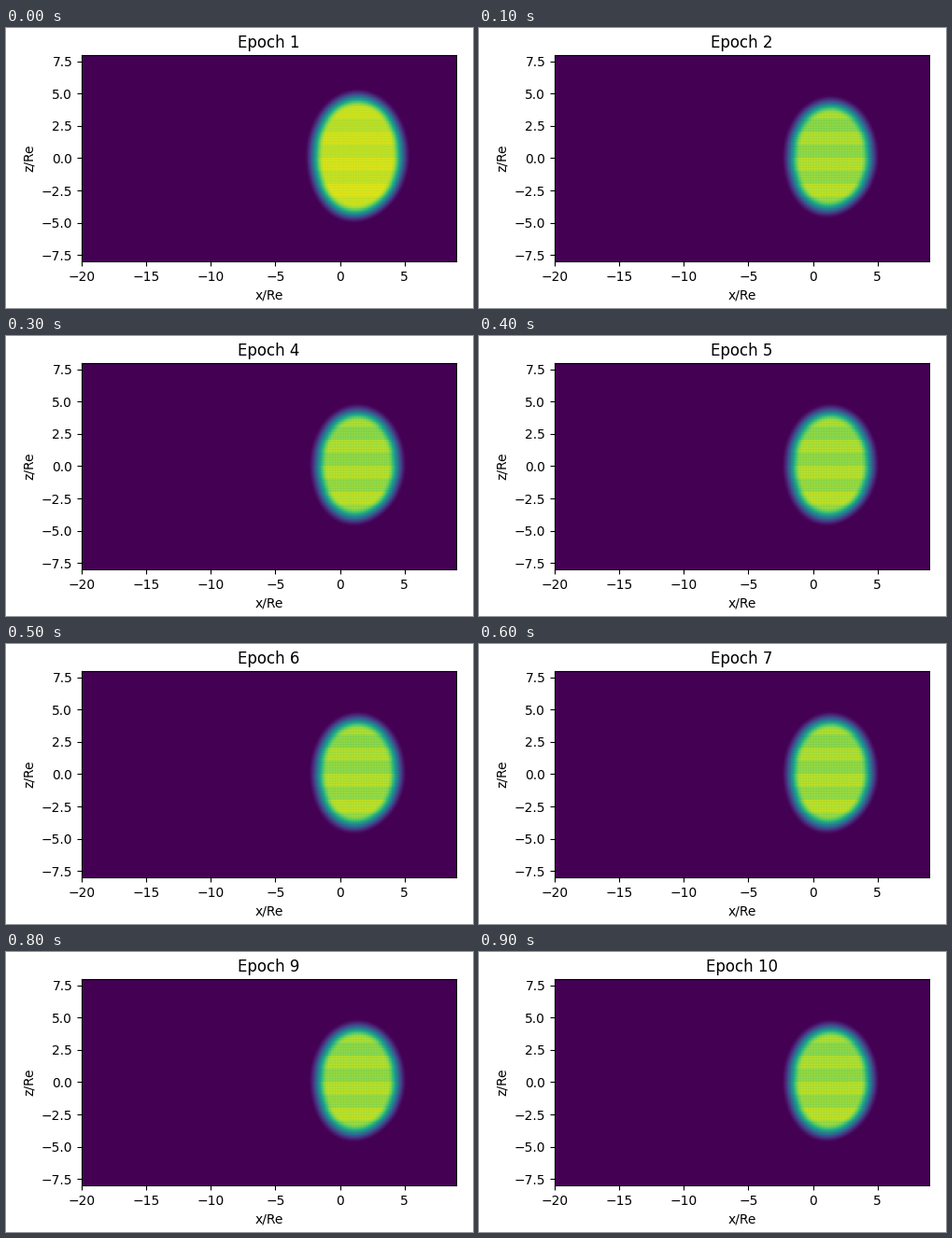
A matplotlib script that plays this animation: 500x300 px, repeating every 1000 ms.

```python
import numpy as np
import matplotlib.pyplot as plt
from matplotlib.animation import FuncAnimation

W, H, DPI = 500, 300, 100
EPOCHS, INTERVAL = 10, 100
X_MIN, X_MAX, Z_MIN, Z_MAX = -20, 9, -8, 8
CELL = 0.1

x = np.arange(X_MIN, X_MAX, CELL) + CELL / 2
z = np.arange(Z_MIN, Z_MAX, CELL) + CELL / 2
X, Z = np.meshgrid(x, z)


def alternate(values):
    """Map integers to -1 (even) and +1 (odd)."""
    return values % 2 * 2 - 1


row_sign = alternate(np.arange(z.size))[:, None]
col_sign = alternate(np.arange(x.size))[None, :]
band_sign = alternate(np.floor(Z))


def smoothstep(t):
    t = np.clip(t, 0, 1)
    return t * t * (3 - 2 * t)


def blob(half_x, half_z, center_z, edge=1.5):
    """Soft ellipse whose lower tip leans to the left."""
    dz = Z - center_z
    dx = X - 1.37 + 0.32 * np.clip(-dz / half_z, 0, 1) ** 2
    r = np.hypot(dx / half_x, dz / half_z) + 1e-9
    depth = (1 - r) * np.hypot(dx, dz) / r
    return smoothstep(depth / edge)


def field(epoch):
    if epoch == 1:
        shape = blob(4.13, 5.25, 0.15)
        level, band, texture = 0.915, 0.015, 0.010
    else:
        shape = blob(3.83, 4.81, 0.09)
        level, band, texture = 0.855, 0.025, 0.015
    return shape * (level + band * band_sign - 0.004 * Z
                    + texture * (row_sign + 0.7 * col_sign))


fig = plt.figure(figsize=(W / DPI, H / DPI), dpi=DPI, facecolor="white")
width = 401
height = width * (Z_MAX - Z_MIN) / (X_MAX - X_MIN)
ax = fig.add_axes([81 / W, 49.88 / H, width / W, height / H])
image = ax.imshow(field(1), origin="lower", extent=(X_MIN, X_MAX, Z_MIN, Z_MAX),
                  cmap="viridis", vmin=0, vmax=1, aspect="auto")
ax.set_xticks(np.arange(-20, 6, 5))
ax.set_yticks(np.arange(-7.5, 8, 2.5))
ax.set_xlabel("x/Re")
ax.set_ylabel("z/Re")
title = ax.set_title("Epoch 1")


def update(i):
    epoch = i + 1
    image.set_data(field(epoch))
    title.set_text(f"Epoch {epoch}")
    return image, title


anim = FuncAnimation(fig, update, frames=EPOCHS, interval=INTERVAL, repeat=True)
plt.show()
```
